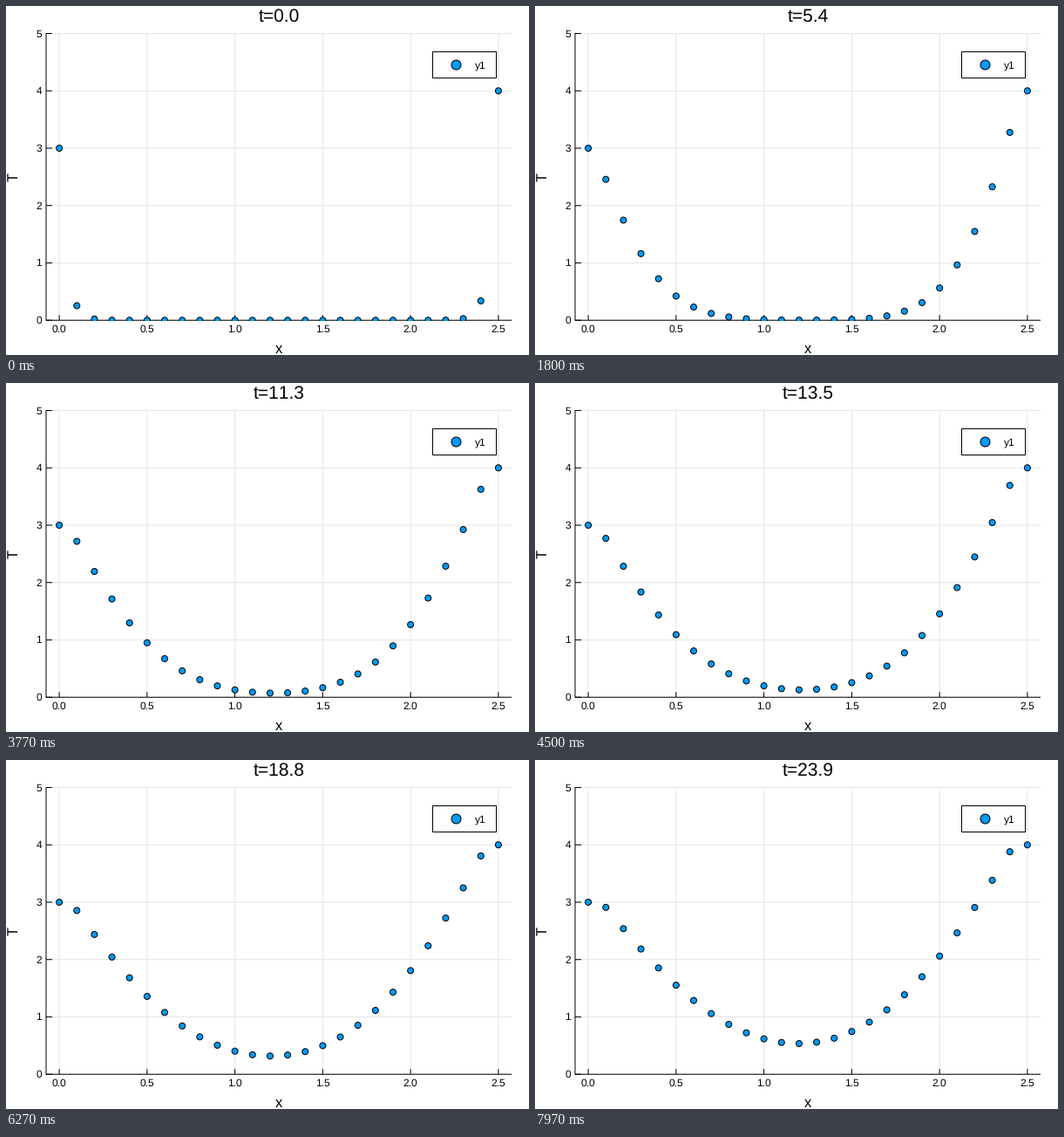
Animation of 600x400 px, one loop 8000 ms. Source, as a matplotlib script:

```python
import numpy as np
import matplotlib.pyplot as plt
from matplotlib.animation import FuncAnimation
from matplotlib.patches import Circle, Rectangle

W, H, DPI = 600, 400, 100
PX = 72 / DPI                      # one pixel in points
LOOP_MS, TICK_MS = 8000, 20
STEPS = 240                        # solver steps per loop
LEFT, RIGHT, TOP, BOTTOM = 46.0, 580.0, 31.5, 360.2
BLUE, GRID = "#009afa", "#e5e5e5"
SMALL, GUIDE, TITLE = 12, 16.5, 21  # font sizes in pixels

N = 26                             # grid points
R = 0.1                            # diffusion number per step
T_LEFT, T_RIGHT = 3.0, 4.0


def to_x(x):
    return LEFT + (x + 0.075) / 2.65 * (RIGHT - LEFT)


def to_y(temp):
    return BOTTOM - temp / 5 * (BOTTOM - TOP)


def solve():
    """Implicit heat equation with both end values reset at every step."""
    mat = np.eye(N) * (1 + 2 * R) - R * (np.eye(N, k=1) + np.eye(N, k=-1))
    mat[0, 0] = mat[-1, -1] = 1
    inv = np.linalg.inv(mat)
    temp = np.zeros(N)
    temp[0], temp[-1] = T_LEFT, T_RIGHT
    rows = []
    for _ in range(STEPS):
        temp = inv @ temp
        temp[0], temp[-1] = T_LEFT, T_RIGHT
        rows.append(temp)
    return np.array(rows)


plt.rcParams["font.family"] = "Liberation Sans"
plt.rcParams["text.kerning_factor"] = 6    # practically no kerning
plt.rcParams["text.hinting"] = "none"
fig = plt.figure(figsize=(W / DPI, H / DPI), dpi=DPI, facecolor="white")
ax = fig.add_axes([0, 0, 1, 1])
ax.set_xlim(0, W)
ax.set_ylim(H, 0)
ax.axis("off")


def line(xs, ys, color="black", z=2):
    ax.plot(xs, ys, color=color, lw=PX, zorder=z, snap=False,
            solid_capstyle="butt")


def label(x, y, text, size, ha="center", **kw):
    return ax.text(x, y, text, fontsize=size * PX, ha=ha, va="baseline",
                   **kw)


def dot(x, y, radius, z):
    return ax.add_patch(Circle((x, y), radius, fc=BLUE, ec="black", lw=PX,
                               zorder=z))


for i in range(6):
    x, y = to_x(i / 2), to_y(i)
    line([x, x], [TOP, BOTTOM], GRID, z=1)
    line([LEFT, RIGHT], [y, y], GRID, z=1)
    line([x, x], [BOTTOM, BOTTOM - 6])
    line([LEFT, LEFT + 7], [y, y])
    label(x, 374, f"{i / 2:.1f}", SMALL)
    label(41, y + 4, str(i), SMALL, ha="right")
line([LEFT, LEFT], [TOP - 0.5, BOTTOM + 0.5])
line([LEFT, RIGHT], [BOTTOM, BOTTOM])

label(313, 398, "x", GUIDE)
label(14, 195.5, "T", GUIDE, rotation=90, rotation_mode="anchor")
title = label(313.5, 18, "", TITLE)

ax.add_patch(Rectangle((489.5, 52.5), 73, 30, fc="white", ec="black",
                       lw=PX, zorder=5, snap=False))
dot(516.5, 67.5, 5.5, 6)
label(538, 72, "y1", SMALL, ha="left", zorder=6)

history = solve()
xs = to_x(np.arange(N) * 0.1)
points = [dot(x, BOTTOM, 3.5, 4) for x in xs]
plot_area = Rectangle((0, 0), W, 361, transform=ax.transData)
for p in points:
    p.set_clip_path(plot_area)


def draw(tick):
    # steps change on the 10 ms mark nearest to their exact time
    step = int((tick * TICK_MS + 15) * STEPS / LOOP_MS)
    step = min(step, STEPS - 1)
    for p, x, y in zip(points, xs, to_y(history[step])):
        p.center = x, y
    title.set_text(f"t={step / 10:.1f}")
    return [*points, title]


anim = FuncAnimation(fig, draw, frames=LOOP_MS // TICK_MS, interval=TICK_MS,
                     repeat=True, repeat_delay=0, blit=False)
plt.show()
```
